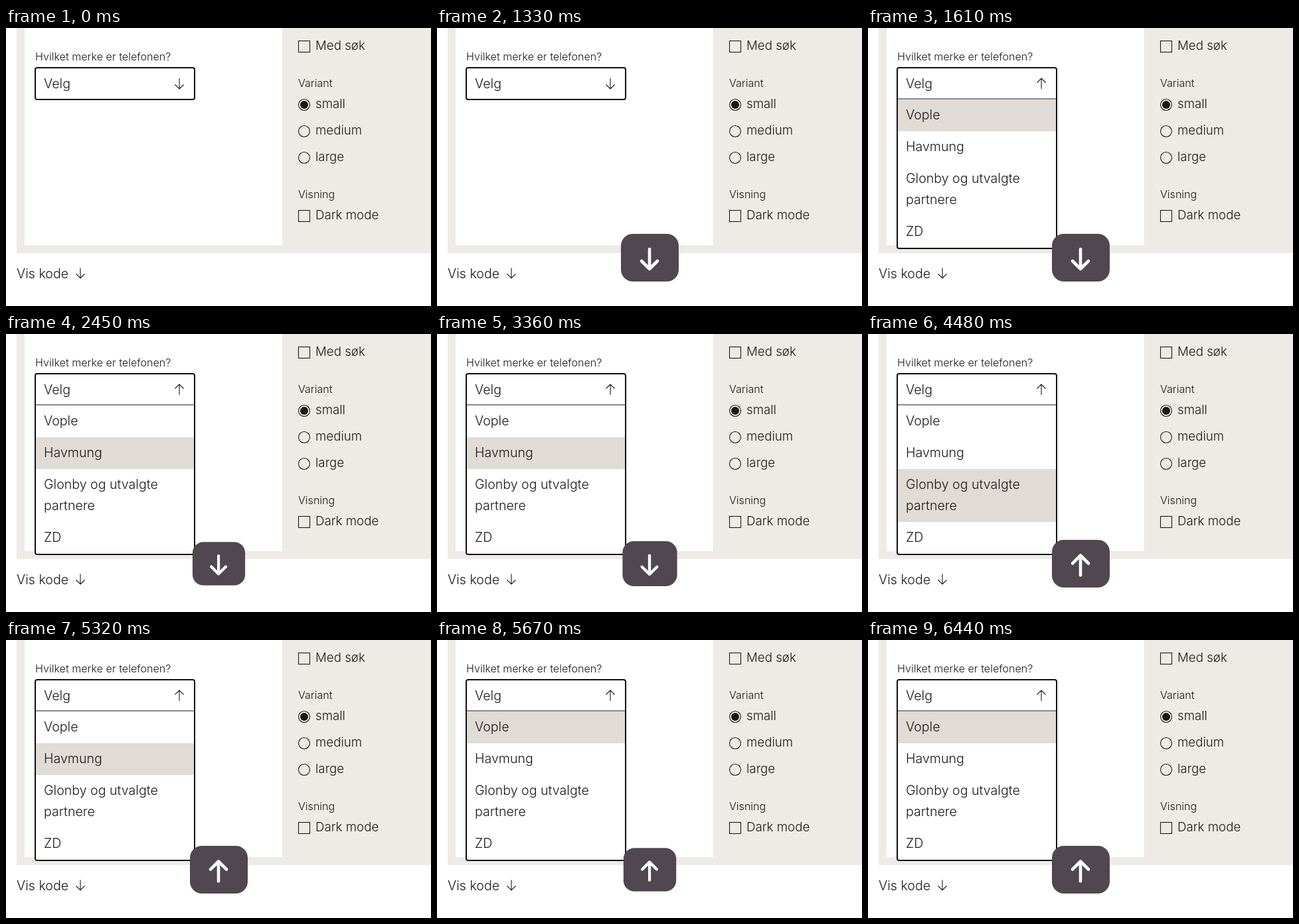
Recreate the animation shown at these times as an HTML page. Size 640 px wide and 420 px high, loop 6510 ms.

```html
<!DOCTYPE html>
<html lang="no">
<head>
<meta charset="utf-8">
<title>Nedtrekksliste</title>
<style>
  html, body { margin: 0; width: 100%; height: 100%; overflow: hidden; background: #fff; }
  svg { display: block; width: 640px; height: 420px; }
  text { font: 300 19.6px Inter, sans-serif; fill: #1b1918; }
  .label { font-size: 16.1px; }
  .choice { font-size: 18.7px; }
  .line { fill: none; stroke: #1b1918; stroke-width: 1.1; }
  .frame { fill: #fff; stroke: #111; stroke-width: 2; }
  .arrow { fill: none; stroke: #fff; stroke-width: 4.6; stroke-linecap: round; stroke-linejoin: round; }
</style>
</head>
<body>
<svg viewBox="0 0 640 420">
  <path fill="#eeeae5" d="M16 0H640V340H16z"/>
  <path fill="#fff" d="M28 0H416V328H28z"/>

  <text class="label" x="44" y="49">Hvilket merke er telefonen?</text>
  <rect id="box" class="frame" x="44" y="60" width="240" height="48" rx="3"/>
  <g id="list">
    <rect id="mark" x="45" width="238" fill="#e1dbd6"/>
    <path class="line" d="M45 107H283"/>
    <text x="57" y="138">Vople</text>
    <text x="57" y="186">Havmung</text>
    <text x="57" y="234">Glonby og utvalgte</text>
    <text x="57" y="266">partnere</text>
    <text x="57" y="314">ZD</text>
  </g>
  <text x="57" y="91">Velg</text>
  <path id="chevron" class="line" d="M261 76V92M254.5 85.5L261 92L267.5 85.5"/>

  <rect class="line" x="440.5" y="19.5" width="17" height="17"/>
  <text class="choice" x="466" y="33">Med søk</text>
  <text class="label" x="440" y="89">Variant</text>
  <circle class="line" cx="449" cy="116" r="8.5"/>
  <circle cx="449" cy="116" r="6" fill="#1b1918"/>
  <text class="choice" x="466" y="121">small</text>
  <circle class="line" cx="449" cy="156" r="8.5"/>
  <text class="choice" x="466" y="161">medium</text>
  <circle class="line" cx="449" cy="196" r="8.5"/>
  <text class="choice" x="466" y="201">large</text>
  <text class="label" x="440" y="257">Visning</text>
  <rect class="line" x="440.5" y="275.5" width="17" height="17"/>
  <text class="choice" x="466" y="289">Dark mode</text>

  <text x="16" y="378">Vis kode</text>
  <path class="line" d="M112 362.5V378M105.5 371.5L112 378L118.5 371.5"/>

  <g id="key">
    <rect x="277" y="311" width="87" height="72" rx="18" fill="#514750"/>
    <path id="keyArrow" class="arrow" d="M320 334V364M308 352L320 364L332 352"/>
  </g>
</svg>
<script>
const LOOP = 6510, STEP = 70;
const KEY_SHOWN = 1120, KEY_FADE = 280, KEY_UP = 4270;

// Each key press: when it dips, when it is released, when the list reacts, and the chosen row.
const presses = [
  { from: 1330, to: 1610, acts: 1400, row: 0 },
  { from: 2170, to: 2730, acts: 2380, row: 1 },
  { from: 3220, to: 3710, acts: 3430, row: 2 },
  { from: 4480, to: 4760, acts: 4550, row: 1 },
  { from: 5320, to: 5950, acts: 5600, row: 0 },
];
const rows = [{ y: 108, height: 48 }, { y: 156, height: 48 }, { y: 204, height: 80 }];

const el = id => document.getElementById(id);
const set = (id, attrs) => {
  for (const name in attrs) el(id).setAttribute(name, attrs[name]);
};
const flip = (on, sum) => on ? `matrix(1 0 0 -1 0 ${sum})` : '';

function draw(t) {
  const done = presses.filter(p => t >= p.acts).pop();
  set('list', { visibility: done ? 'visible' : 'hidden' });
  set('box', { height: done ? 273 : 48 });
  set('chevron', { transform: flip(done, 168) });
  if (done) set('mark', rows[done.row]);

  const press = presses.find(p => t >= p.from && t <= p.to);
  const dip = press ? Math.sin(Math.PI * (t - press.from) / (press.to - press.from)) ** 2 : 0;
  const scale = 1 - 0.09 * dip;
  const opacity = t < KEY_SHOWN ? 0 : Math.min(1, (t - KEY_SHOWN + STEP) / KEY_FADE);
  set('key', {
    opacity,
    transform: `translate(320.5 347) scale(${scale}) translate(-320.5 -347)`,
  });
  set('keyArrow', { transform: flip(t >= KEY_UP, 698.5) });
}

function tick() {
  const t = performance.now() % LOOP;
  draw(Math.floor(t / STEP) * STEP);
  requestAnimationFrame(tick);
}
tick();
</script>
</body>
</html>
```
